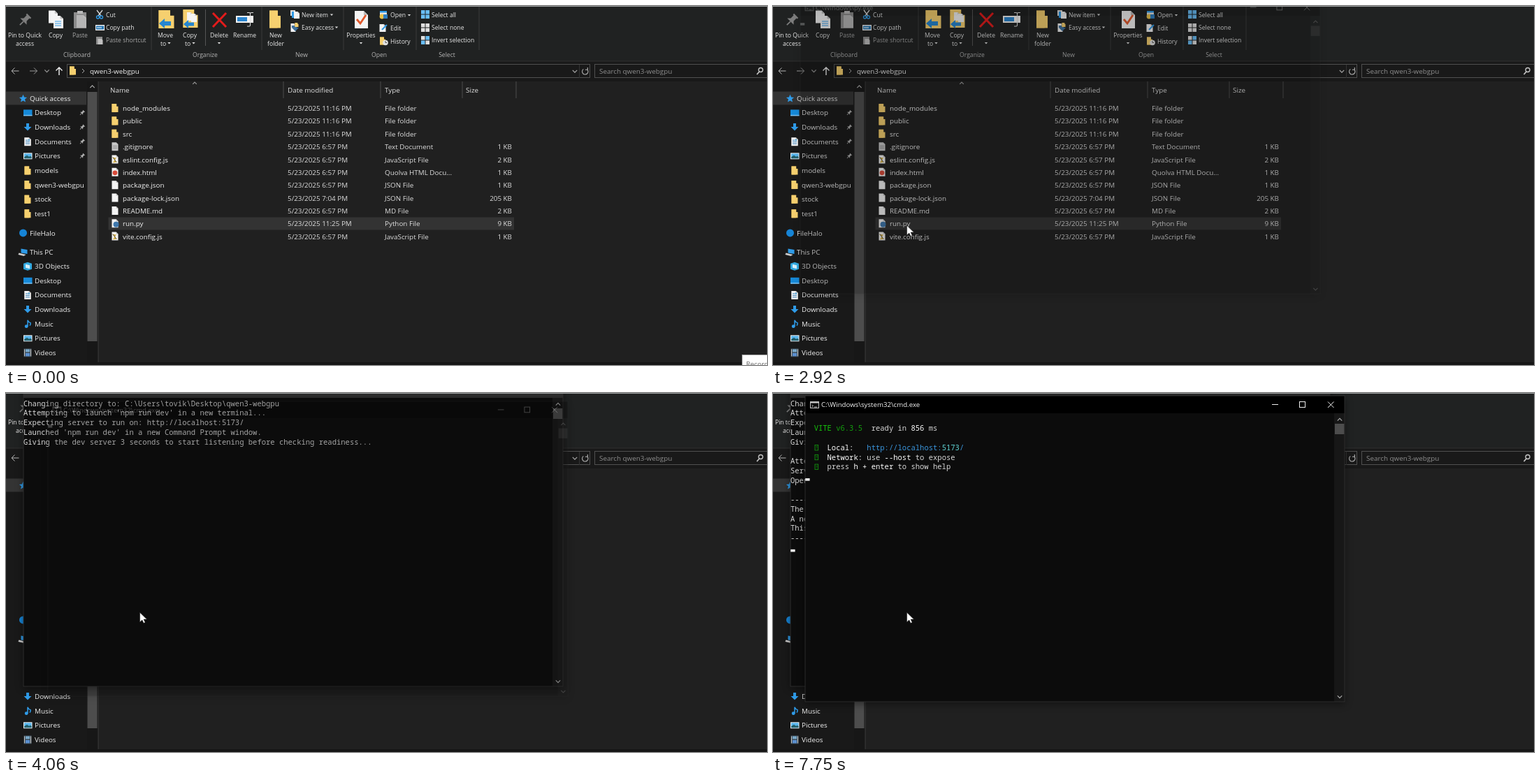
An HTML page that plays this animation: 1089x514 px, repeating every 8 s.

```html
<!DOCTYPE html>
<html lang="en">
<head>
<meta charset="utf-8">
<title>Launching a dev server</title>
<style>
html, body { margin: 0; width: 100%; height: 100%; overflow: hidden; background: #202020; }
svg { display: block; width: 100%; height: 100%; }
text { font-family: "Open Sans", "Noto Sans", sans-serif; white-space: pre; }
.mono text { font-family: "Noto Sans Mono", "DejaVu Sans Mono", monospace; font-size: 10.52px; font-weight: 500; }
</style>
</head>
<body>
<svg id="stage" viewBox="0 0 1089 514" preserveAspectRatio="none"></svg>
<script>
const LOOP = 8000, BLUE = '#2f9be8', GOLD = '#f6d06f';

// Drawing helpers
const rect = (x, y, w, h, fill, more = '') =>
  `<rect x="${x}" y="${y}" width="${w}" height="${h}" fill="${fill}" ${more}/>`;
const path = (d, fill, more = '') => `<path d="${d}" fill="${fill}" ${more}/>`;
const line = (d, color, w = 1) => path(d, 'none', `stroke="${color}" stroke-width="${w}"`);
const circle = (x, y, r, fill) => `<circle cx="${x}" cy="${y}" r="${r}" fill="${fill}"/>`;
const text = (x, y, s, fill = '#f0f0f0', size = 9.85, anchor = 'start') =>
  `<text x="${x}" y="${y + size * 0.36}" font-size="${size}" fill="${fill}" text-anchor="${anchor}">${s}</text>`;
const small = (x, y, s, fill = '#e8e8e8', anchor = 'start') => text(x, y, s, fill, 8.6, anchor);
const label = (x, y, s, fill) => small(x, y, s, fill, 'middle');
const drop = (x, y) => path(`M${x - 2.2} ${y - 1}h4.4l-2.2 2.5z`, '#ddd');
const chevron = (x, y, up, color = '#aaa', r = 3.2) =>
  line(`M${x - r} ${y + (up ? r : -r) / 2}l${r} ${up ? -r : r}l${r} ${up ? r : -r}`, color, 1.2);

// Icons, placed by their centre
const folder = (x, y, w = 9, h = 12) =>
  rect(x - w / 2, y - h / 2, w * 0.72, h, '#d9ac45') +
  path(`M${x - w / 2} ${y - h / 2}h${w * 0.75}v${h * 0.3}h${w * 0.25}v${h * 0.7}h${-w}z`, GOLD);
const page = (x, y, w = 9, h = 12, fill = '#f4f4f4') =>
  path(`M${x - w / 2} ${y - h / 2}h${w * 0.68}l${w * 0.32} ${h * 0.24}v${h * 0.76}h${-w}z`, fill) +
  path(`M${x + w * 0.18} ${y - h / 2}v${h * 0.24}h${w * 0.32}z`, '#bdbdbd');
const icons = {
  folder: (x, y) => folder(x, y),
  plain: (x, y) => page(x, y),
  lines: (x, y) => page(x, y, 9, 12, '#c9c9c9') +
    line(`M${x - 3} ${y - 1}h6m-6 2h6m-6 2h6`, '#777', 0.7),
  script: (x, y) => page(x, y) + path(`M${x - 4} ${y - 3}l6 1l-2 3l3 3l-6 1l2-4z`, '#d5b24a') +
    line(`M${x - 3} ${y - 3}l5 7`, '#555', 1),
  web: (x, y) => page(x, y) + circle(x, y + 1, 3.4, '#d94b3a'),
  snake: (x, y) => page(x, y) + circle(x + 1.5, y + 1.5, 4, '#3f78ad'),
  star: (x, y) => path(`M${x} ${y - 5.5}l1.6 3.8 4 .3-3.1 2.7 1 4-3.5-2.2-3.5 2.2 1-4-3.1-2.7 4-.3z`, BLUE),
  desktop: (x, y) => rect(x - 6, y - 4.5, 12.5, 8.5, '#1689d8') + rect(x - 6, y + 3, 12.5, 1.5, '#7cc4f5'),
  down: (x, y) => path(`M${x - 2} ${y - 5.5}h4v5h3.5l-5.5 5.5-5.5-5.5h3.5z`, BLUE),
  docs: (x, y) => page(x, y, 9.5, 12) + line(`M${x - 3} ${y - 2}h3m-3 2.5h6m-6 2.5h6`, '#3b82b8', 1) +
    rect(x + 0.5, y - 3.5, 2.5, 2.5, '#58a6d6'),
  pics: (x, y) => rect(x - 6, y - 4.5, 12.5, 9, '#f3f3f3') + rect(x - 5, y - 3.5, 10.5, 7, '#58b5ee') +
    path(`M${x - 5} ${y + 3.5}v-2l4-2.5 3 2 2-1 1.5 1.5v2z`, '#23606b'),
  cloud: (x, y) => circle(x, y, 5.5, '#1684d6'),
  pc: (x, y) => path(`M${x - 3} ${y - 5}l9 1.5v6l-9-1.5z`, BLUE) +
    path(`M${x - 6} ${y + 1}l10 2.5-3 2-8-2z`, '#ccc'),
  cube: (x, y) => path(`M${x} ${y - 6}l6 2v8l-6 2-6-2v-8z`, '#33a9e0') +
    path(`M${x - 3} ${y - 3}l6 1.5v5l-6-1.5z`, '#d7f0fa'),
  music: (x, y) => circle(x - 1.8, y + 3.5, 2.4, BLUE) +
    line(`M${x} ${y + 3.5}v-9q1 3 4 4q.5 2-1 4`, BLUE, 1.5),
  video: (x, y) => rect(x - 5.5, y - 6, 11, 12, '#3b4a55') + rect(x - 3, y - 5, 6, 4, '#79a8c8') +
    rect(x - 3, y + 0.5, 6, 4.5, '#5b8fd0') + line(`M${x - 4.5} ${y - 5}v10m9-10v10`, '#ddd', 0.9)
};
const pin = (x, y, k, color) =>
  `<g transform="translate(${x} ${y}) rotate(45) scale(${k})">` +
  path('M-3-6h6v1.5h-1v4l2.5 2.5h-9l2.5-2.5v-4h-1z', color) + rect(-0.6, 2, 1.2, 5, color) + '</g>';

function ribbon() {
  const grey = '#8c8c8c', dim = '#a6a6a6';
  let s = rect(0, 0, 1089, 79, '#202222');
  s += [208, 366, 483, 587, 677].map(x => rect(x - 0.5, 1, 1, 62, '#3b3b3b')).join('');
  s += rect(285, 5, 1, 52, '#555');
  s += [[101.5, 'Clipboard'], [285, 'Organize'], [423, 'New'], [534, 'Open'], [631, 'Select']]
    .map(([x, t]) => label(x, 70, t, '#b4b4b4')).join('');
  s += [[27, 'Pin to Quick', 'access'], [71, 'Copy'], [106, 'Paste'], [228, 'Move'], [263, 'Copy'],
    [305, 'Delete'], [341.5, 'Rename'], [386, 'New', 'folder'], [508, 'Properties']]
    .map(([x, a, b]) => label(x, 41.5, a, a == 'Paste' ? dim : undefined) + (b ? label(x, 54, b) : '')).join('');
  s += label(225, 54, 'to') + label(260, 54, 'to') + drop(233.5, 53) + drop(268.5, 53) + drop(305, 53) + drop(508, 53);
  s += [[143, 12.5, 'Cut'], [143, 31, 'Copy path'], [143, 49, 'Paste shortcut'], [423, 12.5, 'New item'],
    [423, 31, 'Easy access'], [550, 13, 'Open'], [550, 32, 'Edit'], [550, 50.5, 'History'],
    [609, 12.5, 'Select all'], [609, 31, 'Select none'], [609, 49, 'Invert selection']]
    .map(([x, y, t]) => small(x, y, t, t[0] == 'P' ? dim : undefined)).join('');
  s += drop(466, 12.5) + drop(473, 30.5) + drop(577, 13);

  s += pin(27, 20, 1.45, '#7d7d7d');
  s += page(67.5, 15.5, 13, 18) + page(75, 23, 14, 18) + line('M70 22h9m-9 3h9m-9 3h9', BLUE, 1);
  s += rect(97, 9, 18, 23, grey) + rect(102, 7, 8, 4, '#bbb') + page(108, 22, 14, 18, '#b5b5b5');
  s += line('M130 6l6 8m2-8l-6 8', '#d8d8d8', 1.3) +
    '<g fill="none" stroke="#2f9be8" stroke-width="1.3"><circle cx="131.5" cy="16" r="2"/><circle cx="136.5" cy="16" r="2"/></g>';
  s += rect(128, 27, 13, 8, '#eee') + rect(129, 28.5, 11, 5, '#2979b5') + line('M130 31h7', '#fff', 1);
  s += rect(129, 44, 9, 11, grey) + page(135, 51, 7, 8, '#c0c0c0');
  s += folder(229.5, 19, 22, 26) + path('M219 25l8-7v4h9v6h-9v4z', '#2586d0');
  s += folder(264, 18, 21, 26) + page(263, 15, 8, 12) + page(269, 17, 8, 12) +
    path('M254 26l7-6v3.5h8v5h-8v3.5z', '#2586d0');
  s += line('M296 10l19 20m0-20l-19 20', '#e21b1b', 3);
  s += rect(329, 14, 25, 10, '#f2f2f2') + rect(331, 16, 14, 6, '#2a85cf') +
    line('M345 9.5h3q1.5 0 1.5 1.5v16.5q0 1.5-1.5 1.5h-3m9-19.5h-3q-1.5 0-1.5 1.5', '#ddd', 1.1);
  s += folder(385, 19, 16, 25);
  s += rect(407, 6, 7, 8, '#ddd') + rect(409, 8, 7, 9, BLUE) + page(416, 13, 8, 10);
  s += page(411, 31, 7, 12) + path('M409 28h7v3l3 0-5 5-5-5z', '#3d6f9b') + folder(416, 27, 5, 6);
  s += page(508.5, 19.5, 19, 25) + line('M502 19l5 6 8-12', '#e2592c', 2.8);
  s += rect(535, 7, 10, 9, '#e6e6e6') + rect(535, 7, 10, 2.5, BLUE) + circle(538, 15, 3.4, '#e8c24d') +
    path('M540 12h6v6h-6z', '#2f7fc0');
  s += page(539, 31.5, 9, 11) + line('M538 34l7-7', BLUE, 2);
  s += folder(539, 50, 8, 11) + circle(543, 52.5, 3.8, '#e2e2e2') + line('M543 50v2.5h2', '#333', 0.8);
  const tiles = (y, fills) => fills.map((f, i) =>
    rect(594 + (i % 2) * 6.5, y + (i >> 1) * 6.5, 5.5, 5.5, f)).join('');
  s += tiles(6, Array(4).fill('#69bdf5')) + tiles(25, Array(4).fill('#e0e0e0')) +
    tiles(43, ['#e0e0e0', '#69bdf5', '#69bdf5', '#e0e0e0']);
  return s;
}

function addressBar() {
  const box = (x, w) => rect(x + 0.5, 83.5, w, 19, '#191919', 'stroke="#505050"');
  return rect(0, 79, 1089, 29, '#191919') + rect(0, 78.5, 1089, 1, '#303030') +
    line('M18.5 93H8m4.5-4.5L8 93l4.5 4.5', '#b5b5b5') +
    line('M34 93h10.5m-4.5-4.5L44.5 93l-4.5 4.5', '#999') + chevron(58.5, 93, false, '#999') +
    line('M76 99V88m-4.5 4.5L76 88l4.5 4.5', '#f2f2f2', 1.4) +
    box(87, 748) + box(842, 260) + folder(95.5, 92.5) + line('M109 90l3 3-3 3', '#aaa') +
    text(120, 93, 'qwen3-webgpu') + chevron(814, 93.5, false) + rect(820, 84, 1, 19, '#333') +
    line('M831.5 90.6A4.2 4.2 0 1 1 826.3 90.4M832.3 88v3.2h-3.4', '#b5b5b5', 1.1) +
    text(849, 93, 'Search qwen3-webgpu', '#8e8e8e') +
    '<circle cx="1080" cy="91.5" r="3" fill="none" stroke="#c8c8c8" stroke-width="1.3"/>' +
    line('M1078 94l-3.5 4', '#c8c8c8', 1.6);
}

function sidebar() {
  const items = ['star|Quick access', 'desktop|Desktop', 'down|Downloads', 'docs|Documents', 'pics|Pictures',
    'folder|models', 'folder|qwen3-webgpu', 'folder|stock', 'folder|test1', 'cloud|FileHalo', 'pc|This PC',
    'cube|3D Objects', 'desktop|Desktop', 'docs|Documents', 'down|Downloads', 'music|Music', 'pics|Pictures',
    'video|Videos', 'desktop|Local Disk (C:)'];
  let s = rect(0, 108, 132, 402, '#191919') + rect(0, 122.5, 115, 19, '#343434');
  items.forEach((item, i) => {
    const [icon, name] = item.split('|');
    const top = icon == 'star' || icon == 'cloud' || icon == 'pc';
    const y = 132.3 + i * 20.63 + (i > 8 ? 7 : 0) + (i > 9 ? 7 : 0) - (i > 10 ? 0.6 : 0);
    s += icons[icon](top ? 24.5 : 31, y) + text(top ? 34 : 41, y, name);
    if (i > 0 && i < 5) s += pin(109, y, 0.62, '#b0b0b0');
  });
  return s + rect(116.5, 108, 14, 402, '#171717') + rect(116.5, 123, 14, 357, '#4d4d4d') +
    chevron(123.5, 115.5, true) + rect(131.5, 108, 1.2, 402, '#363636') + rect(0, 510, 1089, 4, '#161616');
}

function fileList() {
  const rows = ['folder|node_modules|11:16|File folder', 'folder|public|11:16|File folder',
    'folder|src|11:16|File folder', 'lines|.gitignore|6:57|Text Document|1',
    'script|eslint.config.js|6:57|JavaScript File|2', 'web|index.html|6:57|Quolva HTML Docu...|1',
    'plain|package.json|6:57|JSON File|1', 'plain|package-lock.json|7:04|JSON File|205',
    'plain|README.md|6:57|MD File|2', 'snake|run.py|11:25|Python File|9',
    'script|vite.config.js|6:57|JavaScript File|1'];
  const soft = '#dedede';
  let s = [397, 536, 653, 730].map(x => rect(x - 0.5, 108, 1, 24, '#4d4d4d')).join('') +
    chevron(270, 110.5, true, '#999', 2.8) + rect(146.5, 302.5, 580.5, 18, '#333', 'id="row"');
  [[149, 'Name'], [403, 'Date modified'], [542, 'Type'], [658, 'Size']].forEach(([x, t]) => s += text(x, 120, t, soft));
  rows.forEach((row, i) => {
    const [icon, name, time, type, size] = row.split('|'), y = 146.6 + i * 18.35;
    s += icons[icon](156, y - 0.5) + text(167, y, name) + text(403, y, `5/23/2025 ${time} PM`, soft) +
      text(542, y, type, soft) + (size ? text(724, y, size + ' KB', soft, 9.85, 'end') : '');
  });
  return s;
}

// Console window in its own 772 x 438 space
const consoleWindow = id => `<g id="${id}">` +
  rect(0, 0, 772, 438, '#0c0c0c', 'style="filter:drop-shadow(0 3px 6px #0007)"') +
  rect(0, 0, 772, 25, '#000', `id="${id}Bar"`) +
  rect(7.5, 8.5, 12, 9, '#0a0a0a', 'stroke="#c4c4c4"') + rect(7, 8, 13, 2.5, '#c4c4c4') +
  line('M9.5 13l2 1.5-2 1.5m3.5 0h4', '#ddd', 0.8) +
  `<g id="${id}Title"></g>` +
  line('M668 12.5h9M748 8.5l8.5 8.5m0-8.5l-8.5 8.5', '#eee') +
  rect(707.5, 8.5, 8, 8, 'none', 'stroke="#eee"') +
  rect(757, 25, 15, 413, '#171717') + rect(758, 40, 13.5, 15, '#4d4d4d') +
  chevron(765, 34, true) + chevron(765, 431, false) +
  rect(0, 0, 772, 438, 'none', 'stroke="#343434" stroke-width=".8"') +
  `<g class="mono" id="${id}Out"></g></g>`;

const rowY = k => 33 + 13.75 * k;
const caret = k => rect(0.2, rowY(k) + 2.6, 6.4, 3.6, '#f2f2f2');
const print = rows => rows.map((s, k) => s ? `<text x="0" y="${rowY(k) + 3.5}" fill="#d6d6d6">${s}</text>` : '').join('');
const tint = (color, s) => `<tspan fill="${color}">${s}</tspan>`;
const bright = s => tint('#fff', s);
const missing = k => rect(14, rowY(k) - 3.7, 4.6, 7.4, 'none', 'stroke="#13a10e" stroke-width=".8"') +
  `<text x="14.6" y="${rowY(k) + 2}" style="font-size:5.5px" fill="#13a10e">?</text>`;

const runLog = ['Changing directory to: C:\\Users\\tovik\\Desktop\\qwen3-webgpu',
  "Attempting to launch 'npm run dev' in a new terminal...",
  'Expecting server to run on: http://localhost:5173/',
  "Launched 'npm run dev' in a new Command Prompt window.",
  'Giving the dev server 3 seconds to start listening before checking readiness...', '',
  'Attempting to connect...', 'Server is ready.', 'Opening browser...', '',
  '-'.repeat(40), 'The server is running.', 'A new window is open.', 'This window can close.', '-'.repeat(40)];
const npmLog = ['', '> qwen3-webgpu@0.0.0 dev', '> vite'];
const viteLog = ['',
  `  ${tint('#16c60c', 'VITE')} ${tint('#13a10e', 'v6.3.5')}  ready in ${bright('856')} ms`, '',
  `     ${bright('Local:')}   ${tint('#3a96dd', 'http://localhost:')}${tint('#61d6d6', '5173')}${tint('#3a96dd', '/')}`,
  `     ${bright('Network:')} use ${bright('--host')} to expose`,
  `     press ${bright('h + enter')} to show help`];

const stage = document.getElementById('stage');
stage.innerHTML = rect(0, 0, 1089, 514, '#202020') + ribbon() + addressBar() + sidebar() + fileList() +
  consoleWindow('py') + consoleWindow('cmd') + rect(0, 0, 1089, 1, '#9da0a0') +
  '<g id="tip">' + rect(1053.5, 499.5, 60, 30, '#fff', 'stroke="#999"') + text(1059, 512, 'Recording', '#666') + '</g>' +
  '<g id="ring"><circle r="8" fill="none" stroke="#1d6fb8" stroke-width="4"/>' +
  line('M0-8A8 8 0 0 1 8 0', '#7cc8f7', 4) + '</g>' +
  path('M0 0V13.6L3.2 10.7L5.4 15.2L7.6 14.2L5.5 9.8H10Z', '#fff', 'id="arrow" stroke="#111" stroke-width=".5"');

const el = {};
stage.querySelectorAll('[id]').forEach(n => el[n.id] = n);
const show = (n, on) => n.setAttribute('visibility', on ? 'visible' : 'hidden');
function fill(n, html) {
  if (n.cached !== html) n.innerHTML = n.cached = html;
}

const stepped = (t, start, gap) => Math.floor((t - start) / gap);

function openWindow(n, t, start, x, y) {
  show(n, t >= start);
  const left = 1 - Math.min(1, (50 + 70 * stepped(t, start, 65)) / 330);
  const scale = 1 - 0.05 * left * left;
  n.setAttribute('opacity', t < start ? 0 : 1 - left ** 1.7);
  n.setAttribute('transform', `translate(${x + 386 * (1 - scale)} ${y + 219 * (1 - scale)}) scale(${scale})`);
}

function glide(u, x0, y0, x1, y1) {
  const r = (1 - Math.min(1, u)) ** 2;
  return [x1 + (x0 - x1) * r, y1 + (y0 - y1) * r];
}

function render(t) {
  show(el.tip, t < 70);

  const [x, y] = t < 1410
    ? glide(stepped(t, 520, 70) / 6, 984.5, 488, 598.5, 391)
    : glide(stepped(t, 1410, 68.5) / 11, 539.5, 384.3, 191.6, 314.3);
  show(el.arrow, t >= 520 && (t < 2230 || t >= 2920));
  el.arrow.setAttribute('transform', `translate(${x} ${y})`);
  el.row.setAttribute('fill', t > 1410 && t < 2920 && y < 320.5 ? '#777' : '#333');

  show(el.ring, t >= 2490 && t < 2760);
  el.ring.setAttribute('transform', `translate(190.5 313.5) rotate(${stepped(t, 2490, 68) * 75})`);

  openWindow(el.py, t, 2920, 25, -18);
  openWindow(el.cmd, t, 4060, 46, 4);
  el.pyBar.setAttribute('fill', t < 4060 ? '#000' : '#2b2b2b');

  const printed = [[3850, 3], [3920, 4], [3990, 5], [6980, 7], [7090, 8], [7210, 9], [7490, 15]]
    .reduce((n, [at, count]) => t >= at ? count : n, 0);
  const pyCaret = t < 3390 ? 0 : t >= 7490 ? 15 : t >= 7210 ? 9 : -1;
  fill(el.pyTitle, text(23, 13, 'C:\\Windows\\py.exe', '#eee', 9.7));
  fill(el.pyOut, print(runLog.slice(0, printed)) + (pyCaret < 0 ? '' : caret(pyCaret)));

  const blink = t < 5140 || (t >= 5670 && t < 6210) || (t >= 6740 && t < 7210) || t >= 7750;
  const ready = t >= 5670, npm = t >= 4670;
  fill(el.cmdTitle, text(23, 13, t >= 4600 && t < 4740 ? 'npm' : 'C:\\Windows\\system32\\cmd.exe', '#f4f4f4', 9.7));
  fill(el.cmdOut, (ready ? print(viteLog) + [3, 4, 5].map(missing).join('') : npm ? print(npmLog) : '') +
    (blink ? caret(ready ? 6 : npm ? 4 : 0) : ''));
}

const began = performance.now();
function tick() {
  render((performance.now() - began) % LOOP);
  requestAnimationFrame(tick);
}
tick();
</script>
</body>
</html>
```
